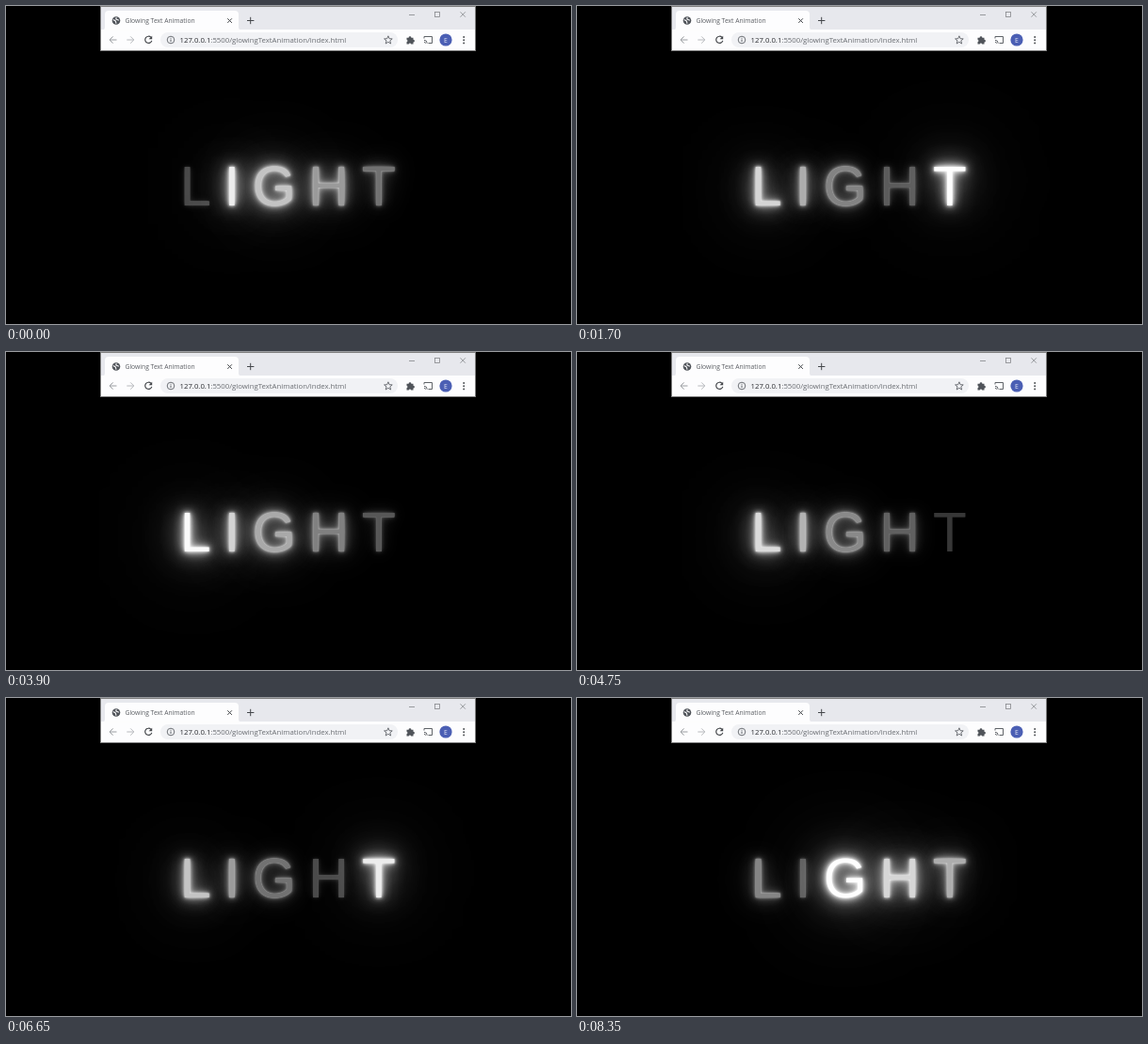
An HTML page for the animation above (8.4 s loop, 600x338 px).

```html
<!DOCTYPE html>
<html lang="en">
<head>
<meta charset="utf-8">
<title>Glowing Text Animation</title>
<style>
  html, body { margin: 0; width: 100%; height: 100%; overflow: hidden; background: #000; }
  #stage { position: relative; width: 600px; height: 338px; overflow: hidden; background: #000; }
  #browser { position: absolute; left: 0; top: 0; }
  #browser text { font-family: "Open Sans", sans-serif; }
  .line { fill: none; stroke: #5f6368; stroke-width: 1; }
  #word {
    position: absolute; left: 185px; top: 158px;
    font: 58.5px/67px "Liberation Sans", Arial, sans-serif;
    letter-spacing: 14.1px; white-space: nowrap;
  }
  #word span {
    --k: 0;
    --tone: calc(51 + 204 * var(--k));
    --glow: rgba(255, 255, 255, var(--k));
    color: rgb(var(--tone), var(--tone), var(--tone));
    text-shadow:
      0 0 calc(3px * var(--k)) var(--glow),
      0 0 calc(6px * var(--k)) var(--glow),
      0 0 calc(12px * var(--k)) var(--glow),
      0 0 calc(24px * var(--k)) var(--glow),
      0 0 calc(48px * var(--k)) var(--glow),
      0 0 calc(96px * var(--k)) var(--glow);
  }
</style>
</head>
<body>
<div id="stage">
  <div id="word"><span>L</span><span>I</span><span>G</span><span>H</span><span>T</span></div>

  <svg id="browser" width="600" height="48" viewBox="0 0 600 48">
    <rect x="101" width="398" height="26" fill="#e7e8ed"/>
    <rect x="101" y="25" width="398" height="22" fill="#fdfdfe"/>
    <path d="M102 25.5q3 0 3-3V9q0-4 4-4h134q4 0 4 4v13.500q0 3 3 3z" fill="#fdfdfe"/>
    <rect x="100.500" y=".5" width="398" height="47" fill="none" stroke="#808080"/>

    <!-- tab -->
    <circle cx="117" cy="15.500" r="4.300" fill="#50545a"/>
    <path d="M113.800 14.600l2.600 1.400.6 2.600M117.200 12.200l-.4 1.800 3 1.200" fill="none" stroke="#fdfdfe" stroke-width="1.100"/>
    <text x="126.500" y="18" font-size="6.760" fill="#5a5d62">Glowing Text Animation</text>
    <path class="line" d="M235.300 13.300l4.600 4.600m0-4.600l-4.600 4.600" style="stroke:#44474b"/>
    <path class="line" d="M256 15.500h7.400m-3.700-3.700v7.400" style="stroke:#44474b"/>

    <!-- window buttons -->
    <g class="line" style="stroke:#85878b;stroke-width:.8">
      <path d="M428 9.500h6M482.500 6.300l5.400 5.400m0-5.400l-5.400 5.400"/>
      <rect x="455.500" y="6.500" width="5" height="5"/>
    </g>

    <!-- navigation -->
    <path class="line" d="M117.500 36h-7.500m3.600-3.600l-3.600 3.600 3.600 3.600" style="stroke:#9a9da1"/>
    <path class="line" d="M128.300 36h7.500m-3.600-3.600l3.600 3.600-3.600 3.600" style="stroke:#b7b9bd"/>
    <path class="line" d="M154 33.400a3.600 3.600 0 1 0 .8 3.400" style="stroke:#44474b;stroke-width:1.200"/>
    <path d="M155.200 31.700v3.600h-3.600z" fill="#44474b"/>

    <!-- address -->
    <rect x="164" y="28" width="252" height="16" rx="8" fill="#f1f2f5"/>
    <circle class="line" cx="175" cy="36" r="3.800" style="stroke-width:.9"/>
    <path class="line" d="M175 35.500v2.500m0-4.200v.9"/>
    <text x="184.500" y="38.900" font-size="7.780" fill="#6a6d72"><tspan fill="#292b2f">127.0.0.1</tspan>:5500/glowingTextAnimation/index.html</text>
    <path class="line" d="M405.900 31.800l1.200 2.900 3.100.2-2.400 2 .8 3.100-2.700-1.700-2.700 1.700.8-3.100-2.400-2 3.100-.2z" style="stroke-width:.9"/>

    <!-- extensions, cast, profile, menu -->
    <path d="M425.500 33.700h2.100a1.400 1.400 0 0 1 2.800 0h2.100v2.100a1.400 1.400 0 0 1 0 2.800v1.900h-2.300a1.300 1.300 0 0 0-2.500 0h-2.200v-2.300a1.300 1.300 0 0 0 0-2.500z" fill="#50545a"/>
    <path class="line" d="M444 34.500v-2h8.500v7h-4M444 36.300q3.200 0 3.200 3.400M444 38.200q1.400 0 1.400 1.500"/>
    <circle cx="467" cy="36" r="6.600" fill="#4b5fb4"/>
    <text x="467" y="38.500" font-size="6.800" fill="#e6e9f7" text-anchor="middle">E</text>
    <g fill="#44474b">
      <circle cx="486.200" cy="33" r=".95"/><circle cx="486.200" cy="36.200" r=".95"/><circle cx="486.200" cy="39.400" r=".95"/>
    </g>
  </svg>
</div>
<script>
  const LOOP = 8400, STEP = 50, PERIOD = 1007, START = 0.105;
  const letters = [...document.querySelectorAll('#word span')];

  // Each letter brightens linearly, then drops to dark a fifth of a period after the one before it.
  function draw() {
    const now = (performance.now() + 5) % LOOP;
    const time = Math.floor(now / STEP) * STEP;
    letters.forEach((letter, i) => {
      const cycle = time / PERIOD + START - i / letters.length + 1;
      letter.style.setProperty('--k', (cycle % 1).toFixed(4));
    });
    requestAnimationFrame(draw);
  }
  draw();
</script>
</body>
</html>
```
